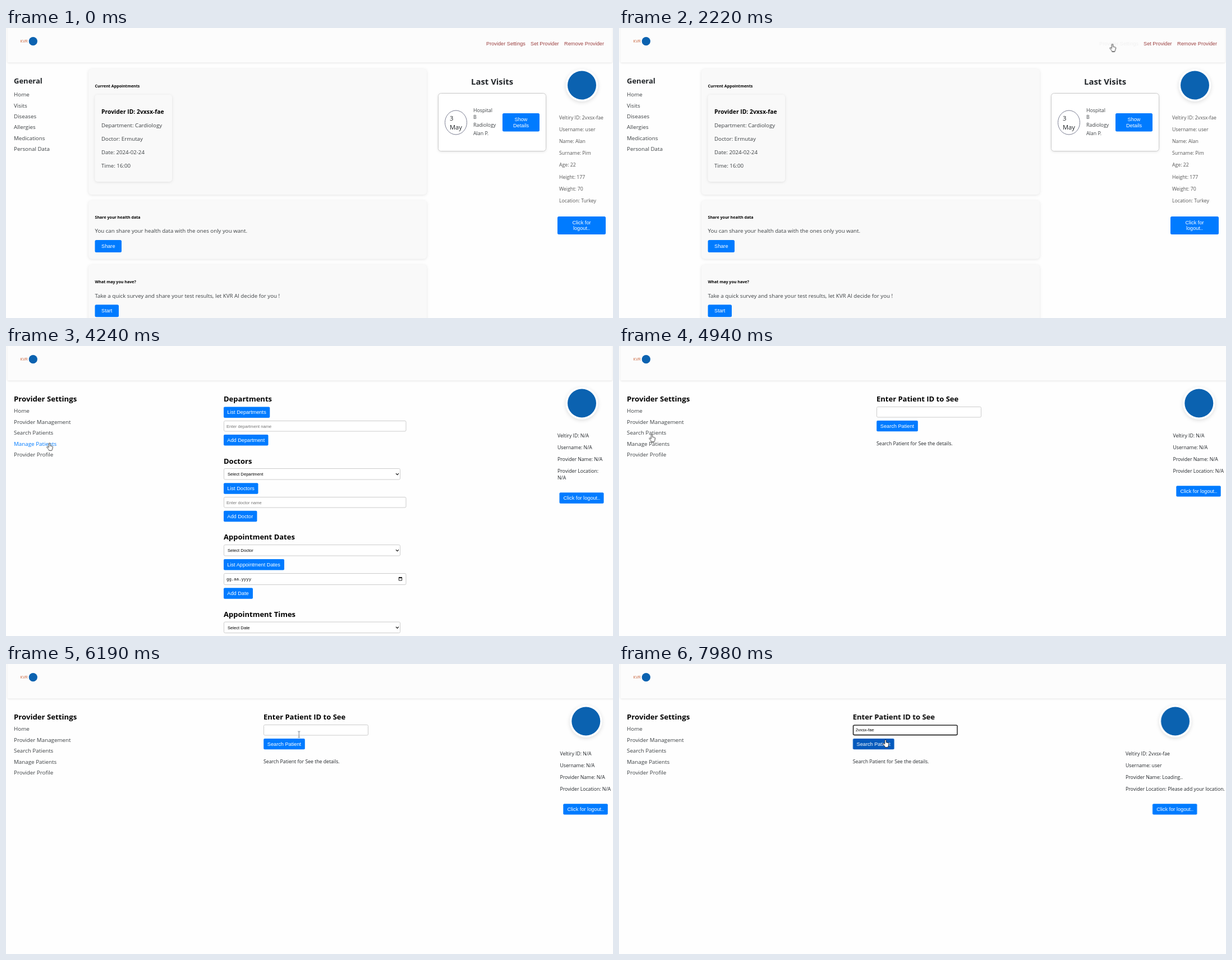
An HTML page that plays this animation: 1082 by 517 pixels, repeating every 8 s.

```html
<!DOCTYPE html>
<html lang="en">
<head>
<meta charset="utf-8">
<title>Patient portal</title>
<style>
html, body { margin: 0; width: 100%; height: 100%; overflow: hidden; background: #fefefe; }
svg { display: block; width: 100%; height: 100%; font: 9.7px "Open Sans", "Noto Sans", sans-serif; fill: #3c4043; cursor: default; }

/* type */
.nav { font-size: 9.8px; }
.h2 { font-weight: 700; font-size: 13px; fill: #000; }
.title { font-size: 13.2px; }
.h5 { font-weight: 700; font-size: 7.1px; fill: #000; }
.info { font-size: 8.7px; fill: #212529; }
.soft { fill: #555; }
.visit { font-size: 8.85px; }
.ui { font: 9.2px "Liberation Sans", Arial, sans-serif; }
.link { fill: #9c4040; }
.btn text { font: 9.2px "Liberation Sans", Arial, sans-serif; fill: #fff; }
.btn rect { fill: #007bff; }
.field text { font: 7.65px "Liberation Sans", Arial, sans-serif; fill: #000; }
.field .hint { fill: #757575; }
.field .date { font-family: "Liberation Mono", monospace; font-size: 7.35px; }
.mid { text-anchor: middle; }

/* boxes */
.field rect, .box { fill: #fff; stroke: #ccc; }
.card { fill: #f9f9f9; filter: drop-shadow(0 1.5px 2.5px rgba(0,0,0,.1)); }
.bar { fill: #fcfcfc; filter: drop-shadow(0 1px 1.5px rgba(0,0,0,.1)); }
.lift { filter: drop-shadow(0 1.5px 2px rgba(0,0,0,.1)); }
.disc { fill: #fff; filter: drop-shadow(0 2px 3px rgba(0,0,0,.12)); }
.mark { fill: #0b62b0; }
.chev { fill: none; stroke: #111; stroke-width: 1.2; }

/* timeline: 1% = 80 ms */
.step { animation: 8s step-end infinite; }
.flow { animation: 8s linear infinite; }
#home { animation-name: home; }
#form { animation-name: form; }
#search, #wide { animation-name: search; }
#narrow { animation-name: narrow; }
#entry { animation-name: shift; }
#before { animation-name: before; }
#after { animation-name: after; }
#focus { animation-name: focus; }
#typed { animation-name: typed; }
#settings { animation-name: settings; }
#profile { animation-name: profile; }
#manage { animation-name: manage; }
#find { animation-name: find; }
#go { animation-name: press; }
#pointer { animation-name: show; }
#path { animation-name: path; }
#arrow { animation-name: arrow; }
#hand { animation-name: hand; }
#beam { animation-name: beam; }

@keyframes home { from { opacity: 1 } 30.4%, to { opacity: 0 } }
@keyframes form { from { opacity: 0 } 30.4% { opacity: 1 } 58.25%, to { opacity: 0 } }
@keyframes search { from { opacity: 0 } 58.25%, to { opacity: 1 } }
@keyframes narrow { from { opacity: 1 } 58.25%, to { opacity: 0 } }
@keyframes before { from { opacity: 1 } 83.5%, to { opacity: 0 } }
@keyframes after { from { opacity: 0 } 83.5%, to { opacity: 1 } }
@keyframes shift { from { transform: none } 83.5%, to { transform: translate(-42.3px, 0) } }
@keyframes focus { from { opacity: 0 } 81.75%, to { opacity: 1 } }
@keyframes typed { from { opacity: 0 } 90.2%, to { opacity: 1 } }
@keyframes settings { from, 22.5% { fill: #9c4040 } 24.2%, to { fill: #f1f1f1 } }
@keyframes profile { from { fill: #3c4043 } 45.5% { fill: #007bff } 49.1%, to { fill: #3c4043 } }
@keyframes manage { from { fill: #3c4043 } 49.1% { fill: #007bff } 53.9%, to { fill: #3c4043 } }
@keyframes find { from { fill: #3c4043 } 53.9%, to { fill: #007bff } }
@keyframes press { from, 97.9% { fill: #007bff } 99%, to { fill: #0459bc } }
@keyframes show { from { opacity: 0 } 3%, to { opacity: 1 } }
@keyframes arrow {
  from { opacity: 1 } 22.5% { opacity: 0 } 30.4% { opacity: 1 } 45.5% { opacity: 0 }
  63.5% { opacity: 1 } 76.5% { opacity: 0 } 94% { opacity: 1 } 98.1%, to { opacity: 0 }
}
@keyframes hand {
  from { opacity: 0 } 22.5% { opacity: 1 } 30.4% { opacity: 0 } 45.5% { opacity: 1 }
  63.5% { opacity: 0 } 98.1%, to { opacity: 1 }
}
@keyframes beam { from { opacity: 0 } 76.5% { opacity: 1 } 94%, to { opacity: 0 } }
@keyframes path {
  from, 3% { transform: translate(620px, 450px) }
  3.9% { transform: translate(668px, 420px) }
  4.75% { transform: translate(745px, 370px) }
  5.6% { transform: translate(776px, 310px) }
  6.5% { transform: translate(715px, 208px) }
  7.25%, 9% { transform: translate(683px, 215px) }
  11.5%, 17.25% { transform: translate(690px, 215px) }
  18.1% { transform: translate(700px, 206px) }
  20% { transform: translate(760px, 150px) }
  21.6% { transform: translate(830px, 80px) }
  23.4% { transform: translate(879px, 30px) }
  24.25%, 29.5% { transform: translate(879.5px, 28.5px) }
  30.4% { transform: translate(870px, 30px) }
  31.25% { transform: translate(800px, 44px) }
  32.5% { transform: translate(620px, 70px) }
  33.75% { transform: translate(480px, 90px) }
  35.5% { transform: translate(368px, 100px) }
  37.25% { transform: translate(210px, 128px) }
  38.1% { transform: translate(144px, 160px) }
  39% { transform: translate(126px, 195px) }
  40%, 41.6% { transform: translate(121px, 223px) }
  45% { transform: translate(90px, 205px) }
  47.5% { transform: translate(80px, 194px) }
  51.1%, 53% { transform: translate(77.5px, 173px) }
  55%, 62.6% { transform: translate(58.5px, 157.5px) }
  63.5% { transform: translate(46px, 168px) }
  64.4% { transform: translate(15px, 190px) }
  65.25% { transform: translate(1px, 225px) }
  66.1% { transform: translate(15px, 262px) }
  67% { transform: translate(35px, 280px) }
  68.75% { transform: translate(120px, 335px) }
  69.6% { transform: translate(190px, 348px) }
  71.25% { transform: translate(330px, 330px) }
  73%, 73.1% { transform: translate(436px, 251px) }
  73.9% { transform: translate(410px, 228px) }
  74.75% { transform: translate(396px, 205px) }
  75.6% { transform: translate(430px, 170px) }
  76.5% { transform: translate(485px, 142px) }
  77.3% { transform: translate(522px, 126px) }
  78.75%, 84.4% { transform: translate(527px, 119px) }
  86.25%, 92.9% { transform: translate(550px, 119px) }
  93.75% { transform: translate(549px, 130px) }
  94.6% { transform: translate(545px, 155px) }
  95.5% { transform: translate(535px, 173px) }
  96.4% { transform: translate(515px, 177px) }
  97.25% { transform: translate(498px, 165px) }
  98.1% { transform: translate(486px, 148px) }
  99% { transform: translate(478px, 140px) }
  99.75%, to { transform: translate(475px, 135px) }
}
</style>
</head>
<body>
<svg viewBox="0 0 1082 517" preserveAspectRatio="none">
  <defs>
    <g id="avatar"><circle class="disc" r="29"/><circle class="mark" r="25.5"/></g>
    <path id="chev" class="chev" d="M695 -1.2l2.5 2.5 2.5-2.5"/>
  </defs>

  <rect id="narrow" class="bar step" x="2.5" y="-6" width="1078" height="67.5" rx="2"/>
  <rect id="wide" class="bar step" x="2.5" y="-6" width="1090" height="67.5" rx="2"/>
  <text class="ui" x="25.5" y="25.8" style="font-size:6.4px;fill:#c8643c">KVR</text>
  <circle class="mark" cx="48.3" cy="23.7" r="7.6"/>

  <g id="home" class="step">
    <g class="ui link">
      <text id="settings" class="flow" x="856" y="31.3">Provider Settings</text>
      <text x="935" y="31.3">Set Provider</text>
      <text x="995" y="31.3">Remove Provider</text>
    </g>
    <text class="h2" x="14" y="99.3" style="fill:#212529">General</text>
    <text class="nav" y="102.8">
      <tspan x="14" dy="19.4">Home</tspan><tspan x="14" dy="19.4">Visits</tspan>
      <tspan x="14" dy="19.4">Diseases</tspan><tspan x="14" dy="19.4">Allergies</tspan>
      <tspan x="14" dy="19.4">Medications</tspan><tspan x="14" dy="19.4">Personal Data</tspan>
    </text>

    <rect class="card" x="147" y="73" width="603" height="224" rx="6"/>
    <rect class="card" x="147" y="307.5" width="603" height="104" rx="6"/>
    <rect class="card" x="147" y="422" width="603" height="120" rx="6"/>
    <rect class="card" x="158.5" y="119" width="137.5" height="155" rx="5"/>
    <text class="h5" x="158.5" y="105.6">Current Appointments</text>
    <text class="h2" x="170" y="152.8" style="font-size:10.35px">Provider ID: 2vxsx-fae</text>
    <text y="153.4">
      <tspan x="170" dy="24">Department: Cardiology</tspan><tspan x="170" dy="24">Doctor: Ermutay</tspan>
      <tspan x="170" dy="24">Date: 2024-02-24</tspan><tspan x="170" dy="24">Time: 16:00</tspan>
    </text>
    <text class="h5" x="158.5" y="340">Share your health data</text>
    <text x="158.5" y="365.2">You can share your health data with the ones only you want.</text>
    <g class="btn"><rect x="158.5" y="378" width="47.5" height="22" rx="2.5"/><text x="170" y="392.2">Share</text></g>
    <text class="h5" x="158.5" y="455.2">What may you have?</text>
    <text x="158.5" y="480.5">Take a quick survey and share your test results, let KVR AI decide for you !</text>
    <g class="btn"><rect x="158.5" y="493.3" width="42.5" height="22" rx="2.5"/><text x="170" y="507.4">Start</text></g>

    <text class="h2" x="829" y="100.8" style="font-size:14.9px;fill:#212529">Last Visits</text>
    <rect class="box lift" x="770.5" y="116.5" width="192" height="103" rx="5"/>
    <ellipse cx="802" cy="168.5" rx="19.5" ry="21.5" fill="none" stroke="#6c7086" stroke-width=".9"/>
    <text style="font-size:11.2px;fill:#212529"><tspan x="791" y="165.3">3</tspan><tspan x="791" y="181.2">May</tspan></text>
    <text class="visit">
      <tspan x="833" y="149.6">Hospital</tspan><tspan x="833" y="161.6">B</tspan>
      <tspan x="833" y="176.4">Radiology</tspan><tspan x="833" y="191.2">Alan P.</tspan>
    </text>
    <g class="btn mid"><rect x="885" y="152" width="66" height="32.5" rx="2.5"/><text x="918" y="166">Show</text><text x="918" y="176.6">Details</text></g>

    <use href="#avatar" x="1026.5" y="102"/>
    <text class="info soft" y="141.9">
      <tspan x="986" dy="21.1">Veltiry ID: 2vxsx-fae</tspan><tspan x="986" dy="21.1">Username: user</tspan>
      <tspan x="986" dy="21.1">Name: Alan</tspan><tspan x="986" dy="21.1">Surname: Pim</tspan>
      <tspan x="986" dy="21.1">Age: 22</tspan><tspan x="986" dy="21.1">Height: 177</tspan>
      <tspan x="986" dy="21.1">Weight: 70</tspan><tspan x="986" dy="21.1">Location: Turkey</tspan>
    </text>
    <g class="btn mid"><rect x="983" y="336" width="86" height="32" rx="2.5"/><text x="1026" y="349.6">Click for</text><text x="1026" y="360.2">logout..</text></g>
  </g>

  <g id="form" class="step">
    <text class="h2 title" x="14" y="99.3">Provider Settings</text>
    <text class="nav" y="99.9">
      <tspan x="14" dy="19.4">Home</tspan><tspan x="14" dy="19.4">Provider Management</tspan>
      <tspan id="find" class="step" x="14" dy="19.4">Search Patients</tspan>
      <tspan id="manage" class="step" x="14" dy="19.4">Manage Patients</tspan>
      <tspan id="profile" class="step" x="14" dy="19.4">Provider Profile</tspan>
    </text>

    <g class="h2">
      <text x="388" y="99.3">Departments</text><text x="388" y="209.5">Doctors</text>
      <text x="388" y="345.4">Appointment Dates</text><text x="388" y="483">Appointment Times</text>
    </g>
    <g class="btn">
      <rect x="388" y="108.5" width="82.3" height="19.5" rx="2"/><text x="394.3" y="121.3">List Departments</text>
      <rect x="388" y="158" width="79.5" height="19.5" rx="2"/><text x="394.3" y="170.8">Add Department</text>
      <rect x="388" y="244.2" width="61.5" height="19.5" rx="2"/><text x="394.3" y="257">List Doctors</text>
      <rect x="388" y="293.8" width="59.5" height="19.5" rx="2"/><text x="394.3" y="306.6">Add Doctor</text>
      <rect x="388" y="380" width="108" height="19.5" rx="2"/><text x="394.3" y="392.8">List Appointment Dates</text>
      <rect x="388" y="431.3" width="52" height="19.5" rx="2"/><text x="394.3" y="444.1">Add Date</text>
    </g>
    <g class="field">
      <rect x="388.5" y="133.5" width="324.5" height="18.5" rx="2"/><text class="hint" x="393" y="145.5">Enter department name</text>
      <rect x="388.5" y="218.5" width="314" height="19.5" rx="2"/><text x="395" y="231">Select Department</text>
      <rect x="388.5" y="269.5" width="324.5" height="18.5" rx="2"/><text class="hint" x="393" y="281.5">Enter doctor name</text>
      <rect x="388.5" y="354.5" width="314" height="19.5" rx="2"/><text x="395" y="367">Select Doctor</text>
      <rect x="388.5" y="405.5" width="324.5" height="20" rx="2"/><text class="date" x="393" y="417.8">gg.aa.yyyy</text>
      <rect x="388.5" y="492" width="314" height="19.5" rx="2"/><text x="395" y="504.6">Select Date</text>
    </g>
    <use href="#chev" y="228.3"/><use href="#chev" y="364.3"/><use href="#chev" y="501.8"/>
    <path d="M700.3 413h5.4v5h-5.4z" fill="none" stroke="#111" stroke-width=".9"/>
    <path d="M700 411.9h6v2h-6z" fill="#111"/>

    <use href="#avatar" x="1026.5" y="102"/>
    <text class="info">
      <tspan x="983" y="163">Veltiry ID: N/A</tspan><tspan x="983" y="184.1">Username: N/A</tspan>
      <tspan x="983" y="205.2">Provider Name: N/A</tspan><tspan x="983" y="226.3">Provider Location:</tspan>
      <tspan x="983" y="238.3">N/A</tspan>
    </text>
    <g class="btn"><rect x="986.5" y="261.3" width="79" height="19.5" rx="2"/><text x="993.4" y="274">Click for logout..</text></g>
  </g>

  <g id="search" class="step">
    <text class="h2 title" x="14" y="99.3">Provider Settings</text>
    <text class="nav" y="99.9">
      <tspan x="14" dy="19.4">Home</tspan><tspan x="14" dy="19.4">Provider Management</tspan>
      <tspan x="14" dy="19.4">Search Patients</tspan><tspan x="14" dy="19.4">Manage Patients</tspan>
      <tspan x="14" dy="19.4">Provider Profile</tspan>
    </text>
    <g id="entry" class="step">
      <text class="h2" x="459" y="99.3">Enter Patient ID to See</text>
      <g class="field">
        <rect x="459.5" y="108.5" width="186" height="18.5" rx="2"/>
        <rect id="focus" class="step" x="459.9" y="109.1" width="185.4" height="17.4" rx="2" style="stroke:#101010;stroke-width:1.4"/>
        <text id="typed" class="step" x="464" y="120.4">2vxsx-fae</text>
      </g>
      <g class="btn"><rect id="go" class="flow" x="459.2" y="133" width="73.6" height="19.2" rx="2"/><text x="465.8" y="145.6">Search Patient</text></g>
      <text class="info" x="459" y="177">Search Patient for See the details.</text>
      <use href="#avatar" x="1033.8" y="102"/>
      <g class="btn"><rect x="993.3" y="249.3" width="79.4" height="19.3" rx="2"/><text x="1000.4" y="262">Click for logout..</text></g>
    </g>
    <text id="before" class="info step" y="141.9">
      <tspan x="987.5" dy="21.1">Veltiry ID: N/A</tspan><tspan x="987.5" dy="21.1">Username: N/A</tspan>
      <tspan x="987.5" dy="21.1">Provider Name: N/A</tspan><tspan x="987.5" dy="21.1">Provider Location: N/A</tspan>
    </text>
    <text id="after" class="info step" y="141.9">
      <tspan x="903" dy="21.1">Veltiry ID: 2vxsx-fae</tspan><tspan x="903" dy="21.1">Username: user</tspan>
      <tspan x="903" dy="21.1">Provider Name: Loading..</tspan><tspan x="903" dy="21.1">Provider Location: Please add your location.</tspan>
    </text>
  </g>

  <g id="pointer" class="step">
    <g id="path" class="flow" fill="#fff" stroke="#111" stroke-width=".8" stroke-linejoin="round">
      <path id="arrow" class="step" d="M0 0v10.2l2.3-2.1 1.7 3.7 1.6-.7-1.6-3.6h3.1z"/>
      <path id="hand" class="step" d="M-1.2 1.2a1.2 1.2 0 0 1 2.4 0v3.6l3.6.8q1.3.4 1.1 1.6l-.6 3.4q-.3 1.6-1.2 2.8h-4.7q-.6-1.6-1.9-3.2l-2.2-2.6q.2-1.4 1.6-1l1.9 1.3z"/>
      <path id="beam" class="step" fill="none" stroke="#456" d="M-2-5.5q2 0 2 1v9q0 1-2 1M2-5.5q-2 0-2 1M0 4.5q0 1 2 1"/>
    </g>
  </g>
</svg>
</body>
</html>
```
